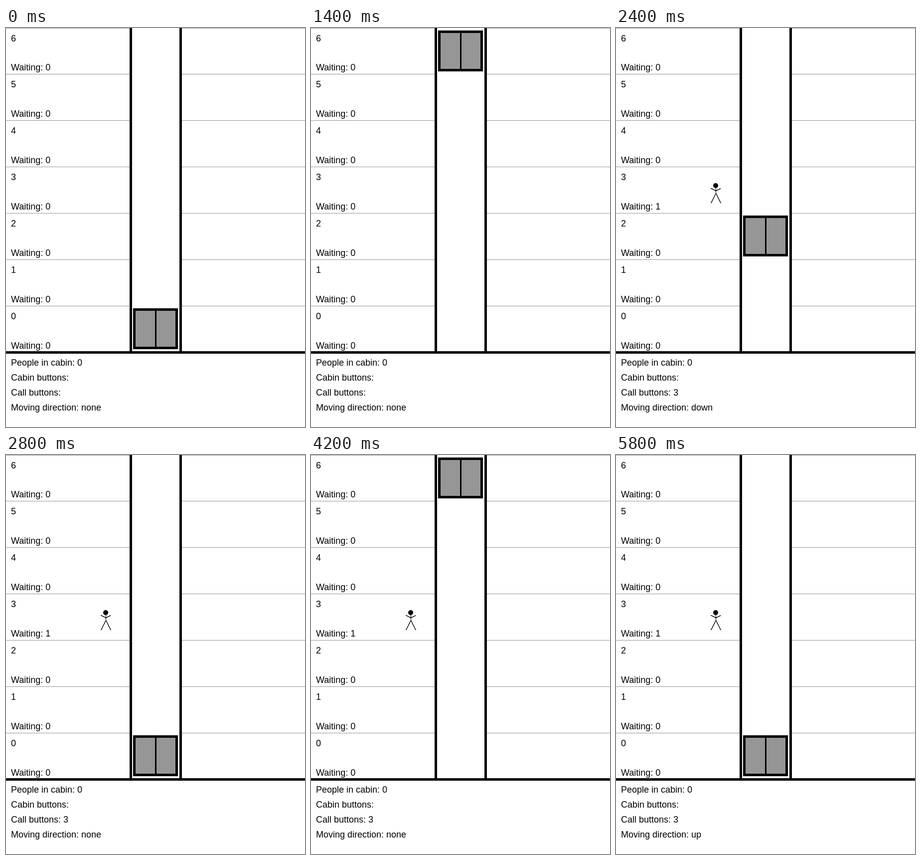
Recreate the animation shown at these times as an HTML page. Size 600x800 px, loop 6000 ms.

```html
<!DOCTYPE html>
<html lang="en">
<head>
<meta charset="utf-8">
<title>Elevator</title>
<style>
  html, body { margin: 0; width: 100%; height: 100%; overflow: hidden; background: #fff; }
  svg { display: block; }
  text { font: 18px "Liberation Sans", Arial, sans-serif; }
</style>
</head>
<body>
<svg id="stage" width="600" height="800" viewBox="0 0 600 800"></svg>
<script>
const STEP = 200, STEPS = 30, TRIP = 7, FLOORS = 7, TOP = FLOORS - 1;
const CALL_STEP = 9, CALL_FLOOR = 3;
const GRAY = '#969696';
const stage = document.getElementById('stage');

function add(tag, attrs, parent = stage) {
  const node = document.createElementNS('http://www.w3.org/2000/svg', tag);
  for (const key in attrs) node.setAttribute(key, attrs[key]);
  return parent.appendChild(node);
}

const rect = (x, y, width, height, fill = '#000', parent) =>
  add('rect', { x, y, width, height, fill }, parent);

function label(y, content = '') {
  const node = add('text', { x: 10, y });
  node.textContent = content;
  return node;
}

const rowY = row => Math.floor(row * 650 / FLOORS);
const floorY = floor => rowY(TOP - floor);

const waiting = [];
for (let floor = 0; floor < FLOORS; floor++) {
  const y = floorY(floor);
  rect(0, y, 600, 1, GRAY);
  label(y + 27, floor);
  waiting[floor] = label(rowY(FLOORS - floor) - 7);
}

// Shaft and ground
rect(248, 0, 105, 650);
rect(253, 0, 95, 650, '#fff');
rect(0, 648, 600, 5);

const cabin = add('g', {});
rect(255, 5, 90, 82, '#000', cabin);
rect(260, 10, 39, 72, GRAY, cabin);
rect(302, 10, 38, 72, GRAY, cabin);

const person = add('g', { transform: `translate(200 ${floorY(CALL_FLOOR)})` });
add('circle', { cx: 0, cy: 38, r: 5 }, person);
add('path', {
  d: 'M.5 43V54M-9.5 43.5L.5 48.5L10.5 43.5M-9.5 73.5L.5 53.5L10.5 73.5',
  fill: 'none', stroke: '#000', 'shape-rendering': 'crispEdges'
}, person);

label(677, 'People in cabin: 0');
label(707, 'Cabin buttons:');
const calls = label(737);
const direction = label(767);

// Each trip: idle on arrival, announce the direction, then one floor per step.
function render(time) {
  const step = Math.floor(time / STEP) % STEPS;
  const phase = step % TRIP;
  const up = Math.floor(step / TRIP) % 2 === 0;
  const travelled = Math.max(0, phase - 1);
  const called = step >= CALL_STEP;

  cabin.setAttribute('transform', `translate(0 ${floorY(up ? travelled : TOP - travelled)})`);
  person.setAttribute('visibility', called ? 'visible' : 'hidden');
  waiting.forEach((node, floor) => {
    node.textContent = `Waiting: ${called && floor === CALL_FLOOR ? 1 : 0}`;
  });
  calls.textContent = `Call buttons: ${called ? CALL_FLOOR : ''}`;
  direction.textContent = `Moving direction: ${phase === 0 ? 'none' : up ? 'up' : 'down'}`;
}

const start = performance.now();
function tick() {
  render(performance.now() - start);
  requestAnimationFrame(tick);
}
tick();
</script>
</body>
</html>
```
